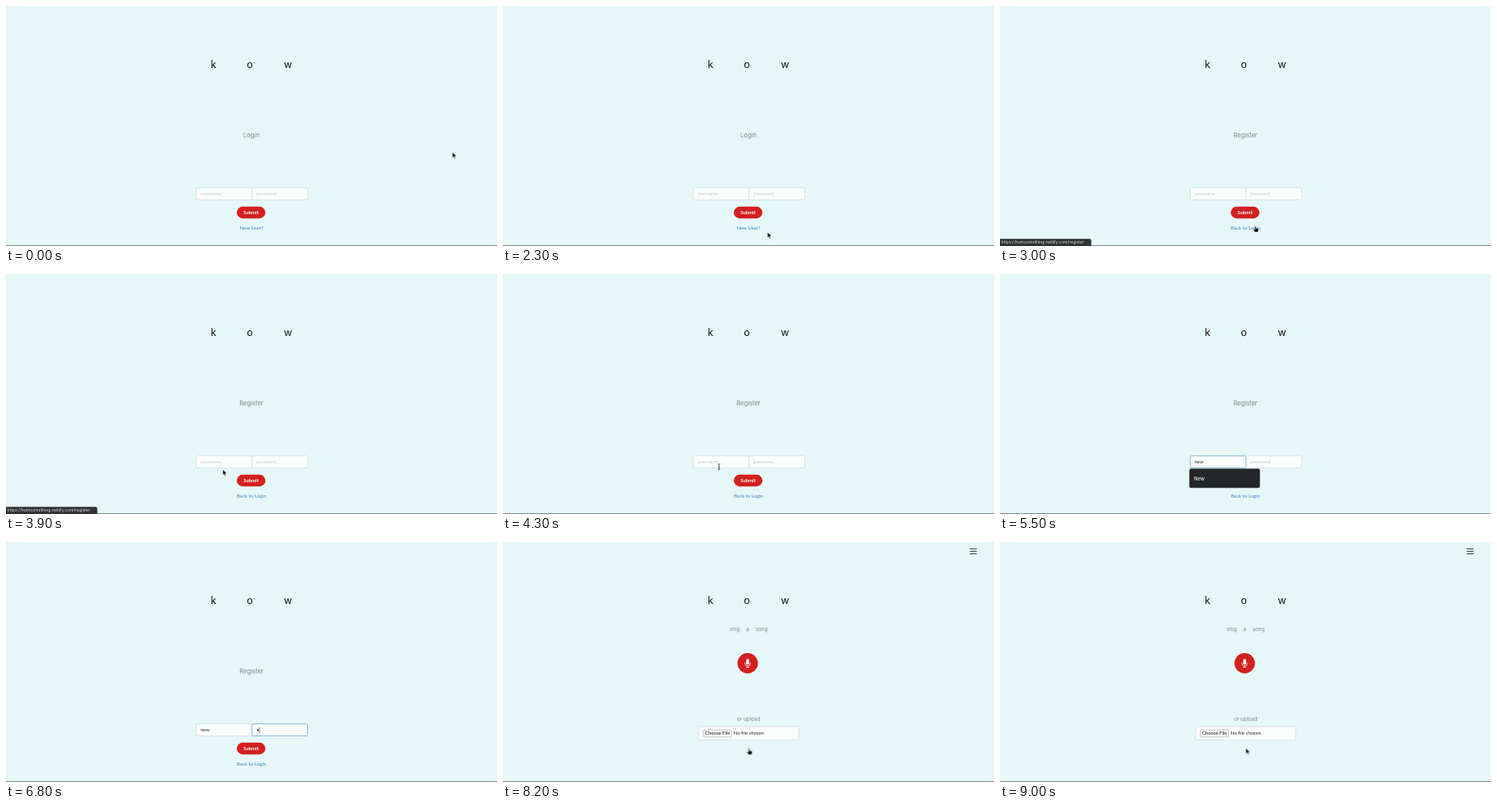
These frames come from a looping animation (600x294 px, 10000 ms). An HTML page:

```html
<!DOCTYPE html>
<html lang="en">
<head>
<meta charset="utf-8">
<title>Sing a song</title>
<style>
html, body { margin: 0; width: 100%; height: 100%; overflow: hidden; background: #e6f7f8; }
svg { display: block; width: 100%; height: 100%; }
text { font: 5.9px Lato, sans-serif; fill: #222; }
.mid { text-anchor: middle; }
.brand text { font: 12.4px Inter, sans-serif; fill: #151515; }
.head { font: 7.6px Inter, sans-serif; fill: #7d8788; }
.sub { font: 6.3px Inter, sans-serif; fill: #7d8788; }
.link { fill: #3f86c3; font-size: 6.1px; }
.hint { fill: #c5c9ca; }
.hint.dark { fill: #85898b; }
.menu rect { fill: #232526; stroke: #15181a; stroke-width: .5; }
.menu text { font: 500 6px Inter, sans-serif; fill: #eceeee; }
.box { fill: #fcfefe; stroke: #d2dcde; stroke-width: .7; }
.focus { fill: none; stroke: #83b9dc; stroke-width: .9; }
.caret { stroke: #111; stroke-width: .6; }
.ink { fill: #0b0b0b; stroke: #fff; stroke-width: .5; stroke-linejoin: round; }

/* One shared 10 s clock; 1% = 100 ms */
.t { animation: 10s step-end -5ms infinite; }
.off { opacity: 0; }
@keyframes form { 82% { opacity: 0 } }
@keyframes home { 82% { opacity: 1 } }
@keyframes login { 30% { opacity: 0 } }
@keyframes register { 30% { opacity: 1 } 46% { opacity: 1 } 82% { opacity: 0 } }
@keyframes hover { 27% { fill: #1e70bf } 30% { fill: #3f86c3 } }
@keyframes status {
  29% { opacity: 1 }
  40% { opacity: 1; animation-timing-function: steps(3, start) }
  43% { opacity: 0 }
}
@keyframes list { 46% { opacity: 1 } 49% { opacity: 0 } }
@keyframes pair { 49% { opacity: 1 } 50% { opacity: 0 } }
@keyframes single { 50% { opacity: 1 } 59% { opacity: 0 } }
@keyframes focusUser { 46% { opacity: 1 } 59% { opacity: 0 } }
@keyframes focusPass { 59% { opacity: 1 } }
@keyframes userHint { 47% { fill: #85898b } 49% { opacity: 0 } }
@keyframes passHint { 59% { fill: #85898b } 68% { opacity: 0 } }
@keyframes typed { 50% { opacity: 1 } }
@keyframes dot { 68% { opacity: 1 } }
@keyframes userCaret {
  47% { opacity: 1; transform: translateX(238px) }
  49% { opacity: 1; transform: translateX(241.6px) }
  50% { opacity: 1; transform: translateX(248.6px) }
  55% { opacity: 0 }
}
@keyframes passCaret {
  59% { opacity: 1; transform: translateX(306.4px) }
  64% { opacity: 0 }
  68% { opacity: 1; transform: translateX(309.7px) }
  73% { opacity: 0 }
  78% { opacity: 1; transform: translateX(309.7px) }
}
@keyframes press {
  0%, 73% { fill: #d3201f; animation-timing-function: steps(4, start) }
  77% { fill: #c5161b }
  80% { fill: #b21e1e }
}
@keyframes move {
  0%, 12% { transform: translate(545.5px, 179px); animation-timing-function: steps(6, start) }
  18% { transform: translate(407px, 254px) }
  20% { transform: translate(407px, 254px); animation-timing-function: steps(4, start) }
  24% { transform: translate(323.2px, 277px); animation-timing-function: steps(4, start) }
  28% { transform: translate(312px, 269px) }
  36% { transform: translate(312px, 269px); animation-timing-function: steps(4, start) }
  40% { transform: translate(265px, 239.5px); animation-timing-function: steps(2, start) }
  42% { transform: translate(264px, 236px) }
  73%, 100% { transform: translate(300.5px, 252.5px) }
}
@keyframes arrow { 27% { opacity: 0 } 36% { opacity: 1 } 41% { opacity: 0 } 83% { opacity: 1 } }
@keyframes hand { 27% { opacity: 1 } 36% { opacity: 0 } 73% { opacity: 1 } 83% { opacity: 0 } }
@keyframes beam { 41% { opacity: 1 } 49% { opacity: 0 } }
</style>
</head>
<body>
<svg viewBox="0 0 600 294" preserveAspectRatio="none">
  <rect y="293" width="600" height="1" fill="#7c898b"/>
  <g class="brand mid">
    <text x="253.7" y="76">k</text>
    <text x="298" y="76">o</text>
    <text x="344.5" y="76">w</text>
  </g>

  <g class="t" style="animation-name:form">
    <g class="t" style="animation-name:login">
      <text class="head mid" x="300" y="160.5">Login</text>
      <text class="link mid t" style="animation-name:hover" x="300" y="274">New User?</text>
    </g>
    <g class="t off" style="animation-name:register">
      <text class="head mid" x="300" y="160.5">Register</text>
      <text class="link mid" x="300" y="274">Back to Login</text>
    </g>

    <rect class="box" x="232.5" y="222.8" width="68" height="14.7" rx="1.4"/>
    <rect class="box" x="300.5" y="222.8" width="68" height="14.7" rx="1.4"/>
    <rect class="focus t off" style="animation-name:focusUser" x="232.5" y="222.8" width="68" height="14.7" rx="1.4"/>
    <rect class="focus t off" style="animation-name:focusPass" x="300.5" y="222.8" width="68" height="14.7" rx="1.4"/>
    <text class="hint t" style="animation-name:userHint" x="237.8" y="232.3">username</text>
    <text class="hint t" style="animation-name:passHint" x="306" y="232.3">password</text>
    <text class="t off" style="animation-name:pair" x="237.8" y="232.3">n</text>
    <text class="t off" style="animation-name:typed" x="237.8" y="232.3">new</text>
    <circle class="t off" style="animation-name:dot" cx="307.8" cy="230.6" r="1.1" fill="#222"/>
    <path class="caret t off" style="animation-name:userCaret" d="M0 227v7"/>
    <path class="caret t off" style="animation-name:passCaret" d="M0 227v7"/>

    <rect class="t" style="animation-name:press" x="282" y="245.8" width="35" height="14.4" rx="7.2" fill="#d3201f"/>
    <text class="mid" style="fill:#fff;font-weight:700" x="299.5" y="255">Submit</text>

    <g class="menu t off" style="animation-name:list">
      <rect x="231.7" y="118.7" width="85.6" height="103.1" rx="1.6"/>
      <text x="237" y="132.3">nurb</text>
      <text x="237" y="148.4">vostel</text>
      <text x="237" y="164.5">jep</text>
      <text x="237" y="180.6">pib</text>
      <text x="237" y="196.7">dravon</text>
      <text x="237" y="212.8">sulero</text>
    </g>
    <g class="menu t off" style="animation-name:pair">
      <rect x="231.7" y="238.8" width="85.6" height="39" rx="1.6"/>
      <text x="237" y="252.6">New</text>
      <text x="237" y="268.7">nurb</text>
    </g>
    <g class="menu t off" style="animation-name:single">
      <rect x="231.7" y="238.8" width="85.6" height="23" rx="1.6"/>
      <text x="237" y="252.6">New</text>
    </g>
  </g>

  <g class="t off" style="animation-name:status">
    <path d="M0 285.3H109.5a2 2 0 0 1 2 2V294H0z" fill="#303334"/>
    <text x="1.5" y="291.4" style="font:5.1px Inter,sans-serif;fill:#d3d6d7">https://humsomething.netlify.com/register</text>
  </g>

  <g class="t off" style="animation-name:home">
    <path d="M570.4 8.4h8.5M570.4 11.4h8.5M570.4 14.4h8.5" stroke="#303738" stroke-width="1"/>
    <text class="sub mid" x="283.2" y="109">sing</text>
    <text class="sub mid" x="299" y="109">a</text>
    <text class="sub mid" x="316" y="109">song</text>
    <circle cx="299" cy="148.5" r="12.5" fill="#d3201f"/>
    <rect x="297.2" y="143.2" width="3.6" height="7" rx="1.8" fill="#fff"/>
    <path d="M295.7 147.8v.8a3.3 3.3 0 0 0 6.6 0v-.8M299 152v1.6M297.2 153.5h3.6" fill="none" stroke="#fff" stroke-width=".8"/>
    <text class="sub mid" x="300.2" y="218.7">or upload</text>
    <rect class="box" x="239" y="226.2" width="122.4" height="16.3" rx="1.4"/>
    <rect x="244.8" y="230.2" width="34.6" height="8.6" rx=".8" fill="#f3f4f4" stroke="#a3a7a8" stroke-width=".6"/>
    <text class="mid" x="262.2" y="236.4">Choose File</text>
    <text x="281.8" y="236.4">No file chosen</text>
  </g>

  <g class="t" style="animation-name:move">
    <path class="ink t" style="animation-name:arrow" d="M0 0V7L1.6 5.6 2.7 8.1 3.9 7.6 2.8 5.1H5z"/>
    <path class="ink t off" style="animation-name:hand" d="M-.7.6Q0-.5.7.6V3L3.6 3.7Q4.2 4 4.1 4.8L3.3 8H-.6L-2.6 5Q-2.6 4-1.7 4.3L-.7 5.2z"/>
    <path class="t off" style="animation-name:beam" d="M-1.4-3.4Q0-3.4 0-2.6Q0-3.4 1.4-3.4M0-2.6V2.8M-1.4 3.6Q0 3.6 0 2.8Q0 3.6 1.4 3.6M-.8.9h1.6" fill="none" stroke="#222" stroke-width=".7"/>
  </g>
</svg>
</body>
</html>
```
